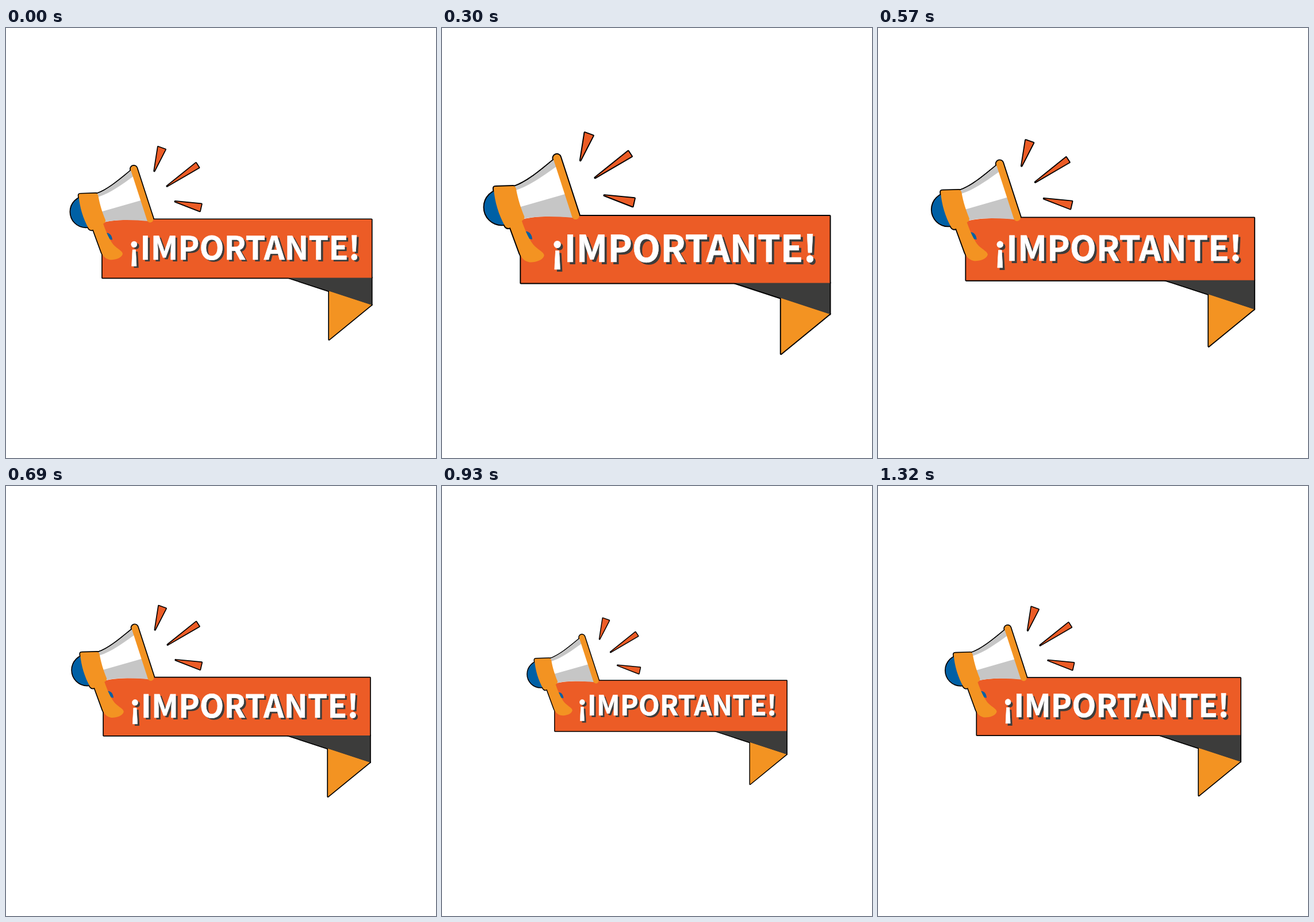
An HTML page for the animation above (1350 ms loop, 748 by 748 pixels).

```html
<!DOCTYPE html>
<html lang="es">
<head>
<meta charset="utf-8">
<title>¡Importante!</title>
<style>
  @property --phase {
    syntax: "<angle>";
    inherits: false;
    initial-value: 0deg;
  }
  html, body {
    margin: 0;
    width: 100%;
    height: 100%;
    overflow: hidden;
    background: #fff;
  }
  svg { display: block; width: 100%; height: 100%; }

  /* One sine wave per loop, drawn in 45 poses */
  .pulse {
    transform-origin: 374.3px 374.3px;
    transform: scale(calc(1 + 0.15 * sin(var(--phase))));
    animation: pulse 1350ms steps(45) infinite;
  }
  @keyframes pulse {
    from { --phase: 0deg; }
    to { --phase: 360deg; }
  }

  .red { fill: #ec5c26; }
  .amber { fill: #f39322; }
  .blue { fill: #0060a5; }
  .dark { fill: #3c3c3b; }
  .grey { fill: #c6c6c6; }
  .white { fill: #fff; }
  text {
    font: 700 55.8px "Noto Sans CJK SC", "Noto Sans CJK JP", "Noto Sans CJK", "Open Sans", sans-serif;
    text-anchor: middle;
    text-rendering: geometricPrecision;
  }
  text.white { stroke: #fff; stroke-width: 0.6; }
</style>
</head>
<body>
<svg viewBox="0 0 748 748">
  <defs>
    <g id="art">
      <!-- banner -->
      <path class="amber" d="M562 457L635.9 481.5L562 542Z"/>
      <path class="dark" d="M490 434H635.9V481.8Z"/>
      <path class="red" d="M167.8 333.1H635.9V434.6H167.8Z"/>

      <!-- sound rays -->
      <path class="red" d="M264.6 206.8L277.2 211.3L258 248.7Z"/>
      <path class="red" d="M330.4 234.8L335.6 242.8L280.2 275.1Z"/>
      <path class="red" d="M294.2 301.8L340 306.3L337.2 318.6Z"/>

      <!-- megaphone -->
      <circle class="blue" cx="139" cy="319.7" r="26.8"/>
      <path class="white" d="M158 288.5C178 281.5 198 264 219 246.8L247 335C220 333 190 333 170 338Z"/>
      <path class="grey" d="M158 288.5C178 281.5 198 264 219 246.8L223 257C202 272 182 287 160 294Z"/>
      <path class="grey" d="M166 319.5L236 299.5L248 336C220 333 188 333 170 338Z"/>
      <path class="blue" d="M172 357C180 354.5 184.5 361 185 368.5L177 367Z"/>
      <path class="amber" d="M151 349L169 340C173 352 178 364 184 373C190 383 203 387 203 393C201 401 188 404 180 403C171 401 168 395 166 390Z"/>
      <path class="amber" d="M129 288.6L156 287.8Q159.5 287.8 160.5 292C163 307 168 322 173 334Q173.5 338 170 340L152 350.5Q147 353 144 349C134 332 128 311 126.5 292Q126 288.6 129 288.6Z"/>
      <rect class="amber" x="-5.6" y="-5.6" width="11.2" height="103.2" rx="5.6" transform="translate(222.3 245.3) rotate(-18)"/>
    </g>
  </defs>
  <g class="pulse">
    <use href="#art" stroke="#000" stroke-width="3.4" stroke-linejoin="round"/>
    <use href="#art"/>
    <text class="dark" x="418" y="406.4">¡IMPORTANTE!</text>
    <text class="white" x="414.4" y="402.9">¡IMPORTANTE!</text>
  </g>
</svg>
</body>
</html>
```
